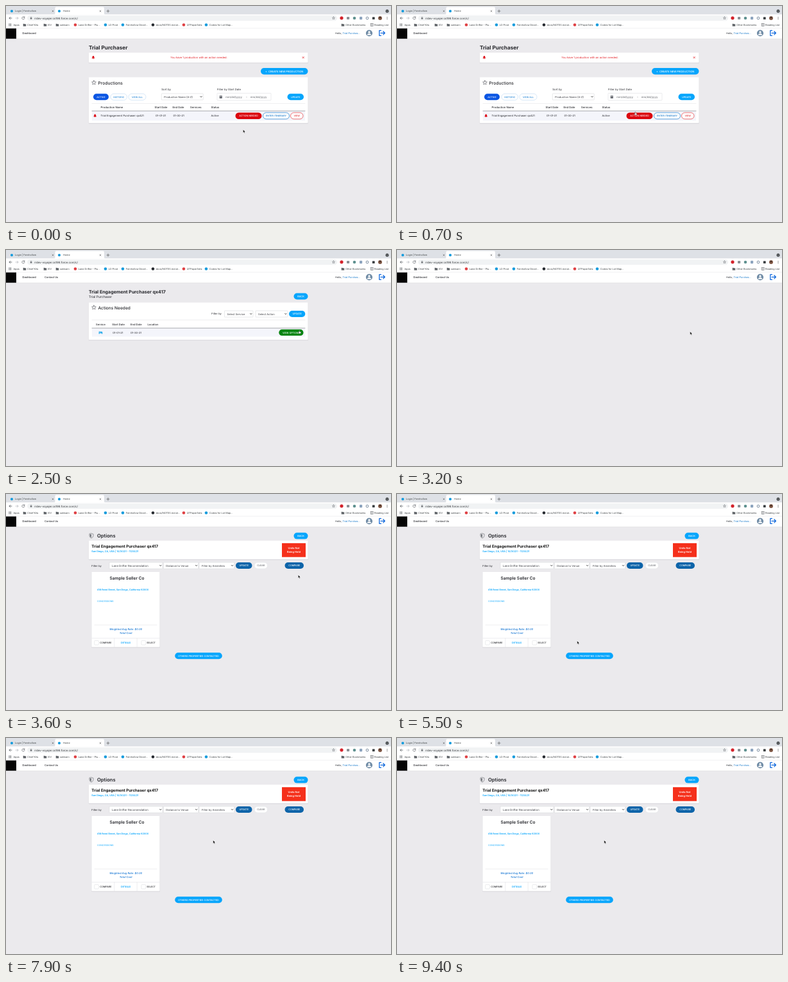
Recreate the animation shown at these times as an HTML page. Size 600 px wide and 338 px high, loop 9.5 s.

```html
<!DOCTYPE html>
<html lang="en">
<head>
<meta charset="utf-8">
<title>Booking portal</title>
<style>
html, body { margin: 0; width: 100%; height: 100%; overflow: hidden; background: #ebeaed; }
svg { display: block; width: 100vw; height: 100vh; font-family: Inter, "Open Sans", sans-serif; }
text { white-space: pre; text-rendering: geometricPrecision; }
</style>
</head>
<body>
<svg id="stage" viewBox="0 0 600 338" preserveAspectRatio="none"></svg>
<script>
const NS = 'http://www.w3.org/2000/svg';
const LOOP = 9500;
const SKY = '#06a5fc', BLUE = '#0a55e3', NAVY = '#0d64a9', RED = '#db0710', GREEN = '#12a31b', INK = '#25262b', GRAY = '#5f6368';
const stage = document.getElementById('stage');
let layer = stage;

function add(tag, attrs, parent = layer) {
  const el = document.createElementNS(NS, tag);
  for (const k in attrs) el.setAttribute(k, attrs[k]);
  return parent.appendChild(el);
}
function group(draw) {
  const g = add('g', {}, stage);
  layer = g;
  draw();
  layer = stage;
  return g;
}
const rect = (x, y, w, h, fill, more = {}) => add('rect', { x, y, width: w, height: h, fill, ...more });
const circle = (cx, cy, r, fill, more = {}) => add('circle', { cx, cy, r, fill, ...more });
const path = (d, stroke, width = 0.7, fill = 'none') =>
  add('path', { d, stroke, 'stroke-width': width, fill, 'stroke-linecap': 'round', 'stroke-linejoin': 'round' });
const line = (x1, y1, x2, y2, stroke = '#e2e2e6', width = 0.6) => path(`M${x1} ${y1}L${x2} ${y2}`, stroke, width);

function text(str, x, y, size, fill = INK, weight = 400, anchor = 'start', more = {}) {
  const el = add('text', { x, y, 'font-size': size, fill, 'font-weight': weight, 'text-anchor': anchor, ...more });
  el.textContent = str;
  return el;
}
function card(x, y, w, h) {
  rect(x - 0.3, y + 0.4, w + 0.9, h + 1, '#dfdee2', { rx: 1 });
  rect(x, y, w, h, '#fff', { rx: 0.8 });
}
function pill(label, x, y, w, fill, h = 10, size = 3.65) {
  const shape = rect(x, y, w, h, fill, { rx: h / 2 });
  text(label, x + w / 2, y + h / 2 + size * 0.36, size, '#fff', 500, 'middle');
  return shape;
}
function outlinePill(label, x, y, w, color, edge = color, h = 10) {
  rect(x, y, w, h, '#fff', { rx: h / 2, stroke: edge, 'stroke-width': 0.7 });
  text(label, x + w / 2, y + h / 2 + 1.3, 3.65, color, 500, 'middle');
}
function select(label, x, y, w, size = 4.1) {
  rect(x, y, w, 10, '#fff', { stroke: '#d9dade', 'stroke-width': 0.6, rx: 0.8 });
  text(label, x + 4, y + 6.5, size, '#3b3c42');
  path(`M${x + w - 4.4} ${y + 4.4}l1.2 1.3 1.2-1.3`, '#222', 0.8);
}
function star(cx, cy, r, color, width) {
  let d = '';
  for (let i = 0; i < 10; i++) {
    const a = i * Math.PI / 5 - Math.PI / 2, q = i % 2 ? r * 0.45 : r;
    d += `${i ? 'L' : 'M'}${cx + q * Math.cos(a)} ${cy + q * Math.sin(a)}`;
  }
  path(d + 'Z', color, width);
}
function bell(x, y) {
  path(`M${x - 1.9} ${y + 1.2}q.7-.6.7-2a1.2 1.3 0 0 1 2.4 0q0 1.4.7 2z`, RED, 0.4, RED);
  circle(x, y + 1.8, 0.6, RED);
}
function folder(x, y) {
  path(`M${x - 2} ${y - 1.5}h1.5l.6.6h2v2.8h-4.1z`, GRAY, 0.3, GRAY);
}
function row(cells, y, size, weight) {
  for (const [x, label] of cells) text(label, x, y, size, INK, weight);
}

function drawBrowser() {
  rect(0, 0, 600, 13.5, '#dee1e6');
  path('M74.5 13.5q2 0 2-2V3.5q0-2 2-2H151q2 0 2 2v8q0 2 2 2z', 'none', 0, '#fff');
  rect(0, 13.2, 600, 22, '#fff');
  [[9, 'Login | Fernhollow', 14, 73], [83, 'Home', 89, 147]].forEach(([dot, label, x, end]) => {
    circle(dot, 8, 2.1, '#159bdc');
    text(label, x, 9.4, 3.8, '#3c4043');
    path(`M${end - 1} 7l2 2m0-2l-2 2`, '#444', 0.5);
  });
  path('M157 8h4m-2-2v4', '#444', 0.6);
  circle(594, 8, 2.5, '#3c4043');
  path('M593 7.6l1 1 1-1', '#fff', 0.6);

  path('M9 19H5m1.8-1.8L5 19l1.8 1.8', '#50545a', 0.7);
  path('M15 19h4m-1.8-1.8L19 19l-1.8 1.8', '#b4b7bb', 0.7);
  path('M28.8 17.8a2.1 2.1 0 1 0 .2 1.8m-.1-2.9v1.4h-1.4', '#50545a', 0.65);
  rect(33, 14.7, 483, 8.6, '#f1f3f4', { rx: 4.3 });
  rect(37.8, 18.4, 2.6, 2.2, GRAY, { rx: 0.3 });
  path('M38.3 18.4v-.6a.8.8 0 0 1 1.6 0v.6', GRAY, 0.45);
  text('rrdev-voyajer.cs198.force.com/c/', 44, 20.5, 4.35, '#2c2f33');
  star(510.5, 19, 2.2, GRAY, 0.5);
  circle(523, 18.8, 2.6, '#d3222b');
  rect(531, 17, 4.2, 4, '#8c9096', { rx: 0.7 });
  circle(543, 19, 2.3, '#5e918f');
  rect(551, 16.8, 4.2, 4.4, '#8ba3bd', { rx: 1 });
  circle(563, 19, 1.9, 'none', { stroke: '#6d7f95', 'stroke-width': 0.9 });
  rect(570.9, 17.2, 3.8, 3.8, '#3c4043', { rx: 0.6 });
  circle(583, 19, 3, '#805744');
  circle(583, 18, 1.1, '#33231f');
  [-1.6, 0, 1.6].forEach(d => circle(594, 19 + d, 0.5, '#444'));

  for (let i = 0; i < 9; i++) rect(4.3 + (i % 3) * 1.5, 27.4 + (i / 3 | 0) * 1.5, 1, 1, GRAY);
  text('Apps', 11.5, 30.9, 3.8, '#3c4043');
  [[29, 'Chief Kits'], [61, 'ISV'], [80, 'oakbarn'], [525, 'Other Bookmarks']].forEach(([x, label]) => {
    folder(x, 29.5);
    text(label, x + 4, 30.9, 3.8, '#3c4043');
  });
  [[108, '#df3e42', 'Lane Drifter - Plu...'], [155, '#159bdc', 'LD Prod'], [182, '#159bdc', 'Fernhollow Devel...'],
   [229, '#25292e', 'docs/NOTES.md at...'], [277, '#df3e42', 'QTPaperSets'], [312, '#159bdc', 'Codes for Lot Map...']]
    .forEach(([x, color, label]) => {
      circle(x, 29.5, 2.3, color);
      text(label, x + 4.8, 30.9, 3.8, '#3c4043');
    });
  rect(568.5, 27.5, 3.6, 4, 'none', { stroke: GRAY, 'stroke-width': 0.6 });
  path('M569.4 28.8h1.8m-1.8 1.3h1.8', GRAY, 0.4);
  text('Reading List', 574, 30.9, 3.8, '#3c4043');
  line(0, 35, 600, 35, '#d6d7da', 0.5);
}

function drawHeader() {
  rect(0, 51, 600, 0.8, '#dddce0');
  rect(0, 35.2, 600, 16, '#fff');
  rect(0, 35.2, 16, 16, '#050505');
  text('Dashboard', 25.5, 44.3, 4.1, INK, 500);
  const hello = text('Hello, ', 513, 44.3, 3.9, '#30343b');
  const user = add('tspan', { fill: '#1578cb' }, hello);
  user.textContent = 'Trial Purchas...';
  circle(566, 42.5, 5.1, '#6f8ba5');
  circle(566, 40.9, 1.7, '#fff');
  path('M562.8 45.6a3.2 2.5 0 0 1 6.4 0z', 'none', 0, '#fff');
  path('M584.5 38.3h-2.7v8h2.7m-.4-4h6m-2.2-2.6l2.5 2.6-2.5 2.6', '#1269dc', 1.3);
}

function drawProductions() {
  text('Trial Purchaser', 129, 68.2, 8.2, INK, 700);
  card(129, 73, 341.5, 15.5);
  bell(136, 80.4);
  text('You have 1 production with an action needed.', 300.5, 82.3, 4.15, '#e21920', 400, 'middle');
  path('M462 79.4l2.4 2.4m0-2.4l-2.4 2.4', '#e21920', 0.7);
  pill('+  CREATE NEW PRODUCTION', 397, 97, 73.5, SKY, 10.2, 4.05);

  card(129, 111.5, 341.5, 71.5);
  star(137, 120, 3.5, '#4b4c52', 0.6);
  text('Productions', 143.5, 122.5, 6.7, INK, 500);
  pill('ACTIVE', 136, 137.3, 24, BLUE);
  outlinePill('HISTORIC', 163, 137.3, 25.5, '#2586d6', '#c6dff5');
  outlinePill('VIEW ALL', 191, 137.3, 27, '#2586d6', '#c6dff5');
  text('Sort by', 242.3, 132.3, 4.3);
  select('Production Name (A-Z)', 242.3, 137, 65);
  text('Filter by Start Date', 329, 132.3, 4.2);
  rect(329, 136.5, 84, 11, '#fff', { stroke: '#dedfe3', 'stroke-width': 0.6, rx: 0.8 });
  rect(332.7, 140.2, 4.2, 4.3, '#5d6068', { rx: 0.5 });
  line(333.4, 141.6, 336.2, 141.6, '#fff', 0.5);
  text('mm/dd/yyyy', 342.3, 143.6, 4.3, '#5c5e64');
  text('-', 374, 143.6, 4.3, '#5c5e64');
  text('mm/dd/yyyy', 380.8, 143.6, 4.3, '#5c5e64');
  pill('UPDATE', 438.5, 137.3, 25.5, SKY);

  line(134, 152.6, 466, 152.6);
  row([[147.5, 'Production Name'], [231.5, 'Start Date'], [259.5, 'End Date'], [287, 'Services'], [319.5, 'Status']], 160.2, 4.2, 500);
  rect(134, 164.4, 332, 15, '#f4f5fb');
  line(134, 164.2, 466, 164.2, '#85868c', 0.7);
  bell(138.7, 171.7);
  row([[147.5, 'Trial Engagement Purchaser qx421'], [233, '01-01-21'], [260.5, '01-30-21'], [319.5, 'Active']], 173.3, 4.1);
  pill('ACTION NEEDED', 357.5, 166.7, 41, RED, 10.4);
  outlinePill('ENTER ITINERARY', 400.5, 166.9, 41, '#1577c9');
  outlinePill('VIEW', 443.5, 166.9, 19.5, '#e0353b');
}

let optionsButton;
function drawActions() {
  text('Trial Engagement Purchaser qx417', 129, 68.2, 7.1, INK, 700);
  text('Trial Purchaser', 129, 75.3, 5.1);
  pill('BACK', 448.5, 67.5, 22, SKY, 10, 3.9);
  card(129, 82.3, 341.5, 58.2);
  star(137, 90, 3.5, '#4b4c52', 0.6);
  text('Actions Needed', 143.5, 92.5, 6.6, INK, 500);
  text('Filter by', 320.3, 101.4, 4.1);
  select('Select Service', 340.5, 95, 44.5);
  select('Select Action', 389, 95, 50);
  pill('UPDATE', 441, 95, 25.3, SKY);
  line(134, 109.5, 466, 109.5);
  row([[140, 'Service'], [165.3, 'Start Date'], [194, 'End Date'], [220.5, 'Location']], 117.8, 4.1, 500);
  rect(134, 122.6, 332, 13, '#f4f5fb');
  line(134, 122.2, 466, 122.2, '#85868c', 0.7);
  path('M145.2 127.8v3.2m0-1h4.6v1m0-1v-1.5h-3.2', '#14a4e9', 0.9);
  circle(146.6, 128.4, 0.8, '#14a4e9');
  rect(147.4, 127.7, 2.6, 1.8, '#14a4e9', { rx: 0.5 });
  row([[166.2, '01-01-21'], [194, '01-30-21']], 130.7, 4.1);
  optionsButton = pill('VIEW OPTIONS', 425.3, 124.3, 38.2, GREEN, 9.8);
}

function drawOptions() {
  path('M133 61.7l3 1v2.5q0 2.6-3 4-3-1.4-3-4v-2.5z', '#74777d', 0.7);
  path('M133 62.7v5.5q-2.2-1.2-2.2-3.3v-1.7z', 'none', 0, '#74777d');
  text('Options', 142, 68.2, 7.6, INK, 600);
  pill('BACK', 448.5, 60.6, 22, SKY, 10, 3.9);
  card(129, 73, 341.5, 29);
  text('Trial Engagement Purchaser qx417', 133.3, 83.8, 6.15, '#111', 700);
  text('San Diego, CA, USA | 10/30/21 - 11/30/21', 133.3, 90.6, 3.75, SKY, 600);
  rect(430, 77, 37, 21.7, '#f5301b');
  text('Units Not', 448.5, 86.3, 4, '#fff', 600, 'middle');
  text('Being Held', 448.5, 92.3, 4, '#fff', 600, 'middle');

  text('Filter by', 133.3, 113.6, 4.1);
  select('Lane Drifter Recomendation', 161, 107, 83, 4.3);
  select('Distance to Venue', 245.3, 107, 54.5);
  select('Filter by Amenities', 301, 107, 54.7);
  pill('UPDATE', 358, 107, 25.5, NAVY);
  outlinePill('CLEAR', 387, 107, 20.6, '#65676d', '#e4e5e8');
  pill('COMPARE', 434.5, 107, 29.5, NAVY);

  card(133.5, 122, 106, 117.5);
  text('Sample Seller Co', 188.5, 133.5, 6.6, INK, 600, 'middle');
  text('418 Reed Street, San Diego, California 92000', 142, 151.2, 3.7, SKY, 600);
  text('CONCESSIONS', 142, 169, 3.5, SKY);
  line(138, 205, 235, 205);
  const italic = { 'font-style': 'italic' };
  text('Weighted Avg Rate: $0.00', 186.7, 213.4, 4.1, '#1173d2', 500, 'middle', italic);
  text('Total Cost', 186.7, 219.3, 4.1, '#1173d2', 500, 'middle', italic);
  line(133.5, 225.7, 239.5, 225.7);
  line(168.8, 225.7, 168.8, 239.5);
  line(204.2, 225.7, 204.2, 239.5);
  for (const x of [137.7, 211]) rect(x, 229.5, 6.6, 6.6, '#fff', { stroke: '#dedfe3', 'stroke-width': 0.6, rx: 0.8 });
  text('COMPARE', 146.3, 234.3, 3.7, INK, 500);
  text('DETAILS', 186.6, 234.3, 3.7, SKY, 600, 'middle');
  text('SELECT', 219.3, 234.3, 3.6, INK, 500);
  pill('OTHERS PROPERTIES CONTACTED', 263.3, 248.3, 73.5, SKY, 9.9, 3.75);
}

rect(0, 0, 600, 338, '#ebeaed');
group(drawBrowser);
group(drawHeader);
const contact = group(() => text('Contact Us', 60, 44.3, 4, INK, 500));
const pages = [drawProductions, drawActions, drawOptions].map(group);
const arrow = group(() => path('M0 0v4.7l1.1-1 .8 1.8.9-.4-.8-1.7h1.5z', '#fff', 0.4, '#111'));
const hand = group(() => path('M-.5-2.2q.5-.5.9 0v1.7l1.7.5q.4.2.3.7l-.4 1.8h-2.4l-1.5-2 .5-.4.9.7z', '#222', 0.35, '#fff'));

// Cursor stops: time, x, y
const stops = [
  [100, 369.5, 193.5], [800, 371.5, 166.5], [1500, 371.5, 166.5], [2400, 457.2, 128.2],
  [3000, 457.2, 128.2], [3600, 455.4, 126.8], [3900, 455.4, 126.8], [4100, 440, 138],
  [4300, 440, 138], [5300, 280.8, 230], [6200, 280.8, 230], [6700, 298, 270],
  [7000, 298, 270], [7700, 322.8, 160.2]
];
function cursorAt(t) {
  const i = stops.findIndex(s => s[0] > t);
  if (i === 0) return stops[0].slice(1);
  if (i < 0) return stops[stops.length - 1].slice(1);
  const [t0, x0, y0] = stops[i - 1], [t1, x1, y1] = stops[i];
  const p = (t - t0) / (t1 - t0), e = p * p * (3 - 2 * p);
  return [x0 + (x1 - x0) * e, y0 + (y1 - y0) * e];
}
function pageAt(t) {
  if (t < 1000) return 0;
  if (t < 1100) return -1;
  if (t < 3000) return 1;
  return t < 3300 ? -1 : 2;
}
const show = (el, on) => el.setAttribute('visibility', on ? 'visible' : 'hidden');

function render(ms) {
  const t = Math.floor(ms % LOOP / 100) * 100;
  const page = pageAt(t), [x, y] = cursorAt(t);
  pages.forEach((g, i) => show(g, i === page));
  show(contact, page !== 0);
  const overAction = page === 0 && y < 177 && x > 357.5;
  const overOptions = page === 1 && x > 425 && y > 124 && y < 135;
  const pointing = overAction || overOptions;
  optionsButton.setAttribute('fill', overOptions ? '#078410' : GREEN);
  show(hand, pointing);
  show(arrow, !pointing);
  (pointing ? hand : arrow).setAttribute('transform', `translate(${x} ${y})`);
}

const start = performance.now();
function tick() {
  render(performance.now() - start);
  requestAnimationFrame(tick);
}
tick();
</script>
</body>
</html>
```
